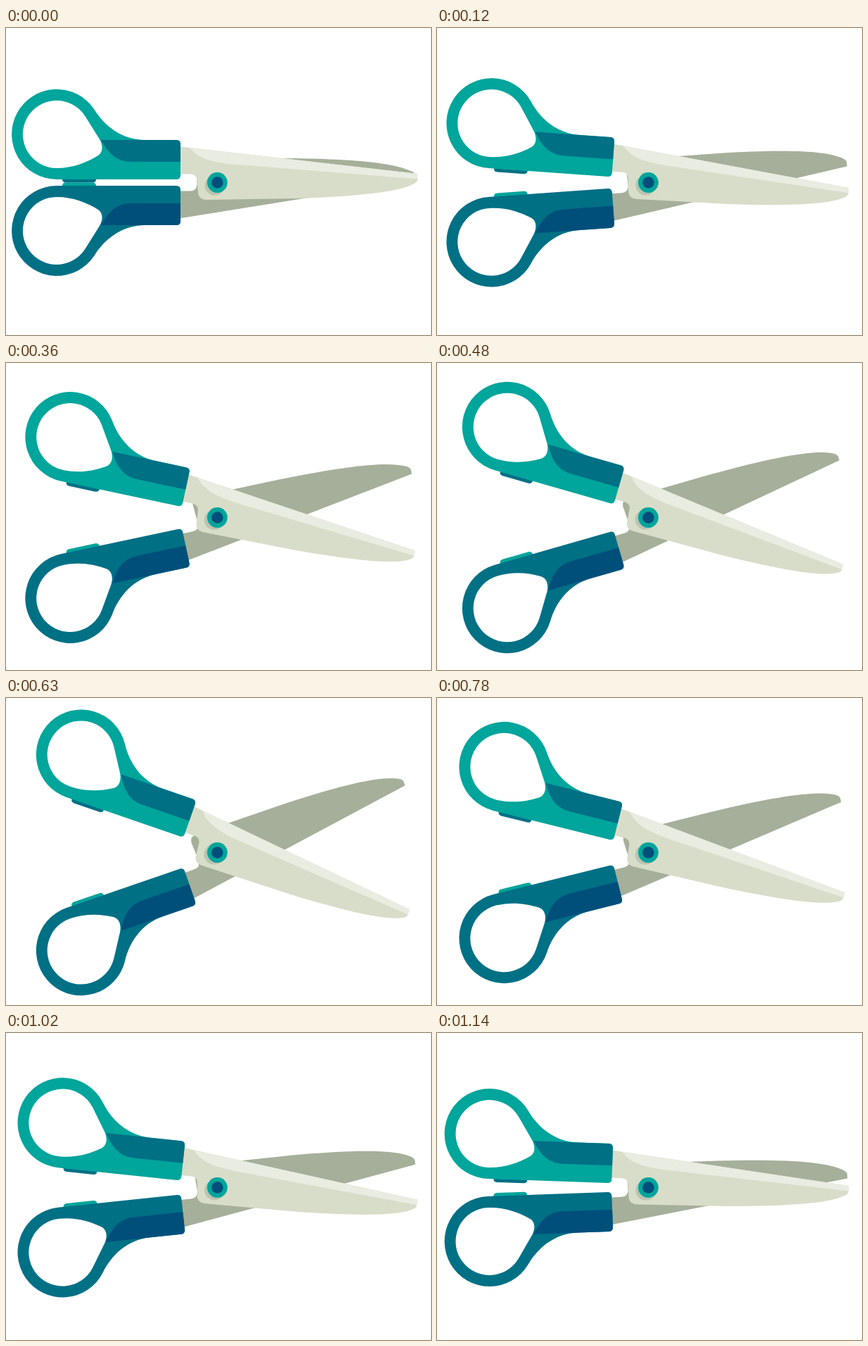
An HTML page with a canvas that plays this animation: 604 px wide and 436 px high, repeating every 1.17 s.

```html
<!DOCTYPE html>
<html lang="en">
<head>
<meta charset="utf-8">
<title>Scissors</title>
<style>
  html, body { margin: 0; width: 100%; height: 100%; overflow: hidden; background: #fff; }
  canvas { display: block; }
</style>
</head>
<body>
<canvas id="stage" width="604" height="436"></canvas>
<script>
const ctx = document.getElementById('stage').getContext('2d');

const STEP = 30;
const STEPS = 39;
const PEAK = 20;
const PIVOT = { x: 300.3, y: 219.5 };

const color = {
  teal: '#00a59b', petrol: '#007085', navy: '#004f7b',
  blade: '#d8ddc9', shine: '#e9ece1', backBlade: '#a5af9a', shadow: '#bcc4b0'
};

// All shapes are laid out in the closed pose.
const handle = new Path2D(
  'M72 215A64 64 0 1 1 125.7 116C140 139 165 159 198 159H242Q248 159 248 165V209Q248 215 242 215Z' +
  'M72 199A48 48 0 1 1 112.3 125L133 158C138 167 138 176 131 181C115 191 95 199 72 199Z');
const inlay = new Path2D('M135 159H242Q248 159 248 165V190H178C158 190 146 179 135 159Z');
const tab = new Path2D('M80 214.5Q80 219.5 85 219.5H123Q128 219.5 128 214.5Z');
const frontBlade = new Path2D(
  'M246 168.2L262 170L585 207V214Q585 218 581 220.5C560 233 500 239 415 242L286 244' +
  'Q274 244 273 234L271.5 217Q271 207.5 262 207.5H246Z');
const shine = new Path2D('M261 169.9L585 207V214.5L322 193.5C288 190 272 184 261 169.9Z');
const backBlade = new Path2D(
  'M246 270.4L583.6 216.3V211Q583.5 207 577 203.8C553 192 500 186 400 185H281' +
  'Q271 185 270 194L271.5 222Q271 231.5 262 231.5H246Z');

function fill(path, style) {
  ctx.fillStyle = style;
  ctx.fill(path, 'evenodd');
}

function disc(x, y, radius, style) {
  ctx.fillStyle = style;
  ctx.beginPath();
  ctx.arc(x, y, radius, 0, Math.PI * 2);
  ctx.fill();
}

function turned(degrees, paint) {
  ctx.save();
  ctx.translate(PIVOT.x, PIVOT.y);
  ctx.rotate(degrees * Math.PI / 180);
  ctx.translate(-PIVOT.x, -PIVOT.y);
  paint();
  ctx.restore();
}

function drawHandle(body, accent, tabColor) {
  fill(tab, tabColor);
  fill(handle, body);
  fill(inlay, accent);
}

function draw(angle) {
  ctx.fillStyle = '#fff';
  ctx.fillRect(0, 0, 604, 436);

  turned(-angle, () => {
    fill(backBlade, color.backBlade);
    ctx.translate(0, 2 * PIVOT.y);
    ctx.scale(1, -1);
    drawHandle(color.petrol, color.navy, color.teal);
  });

  turned(angle, () => {
    fill(frontBlade, color.blade);
    fill(shine, color.shine);
    disc(PIVOT.x - 3.5, PIVOT.y + 4, 14.3, color.shadow);
    drawHandle(color.teal, color.petrol, color.petrol);
  });

  disc(PIVOT.x, PIVOT.y, 14.4, color.teal);
  disc(PIVOT.x, PIVOT.y, 8.3, color.navy);
}

// One degree per step: open to the peak, then close again.
function tick() {
  const step = Math.floor(performance.now() / STEP) % STEPS;
  draw(PEAK - Math.abs(PEAK - step));
  requestAnimationFrame(tick);
}

tick();
</script>
</body>
</html>
```
